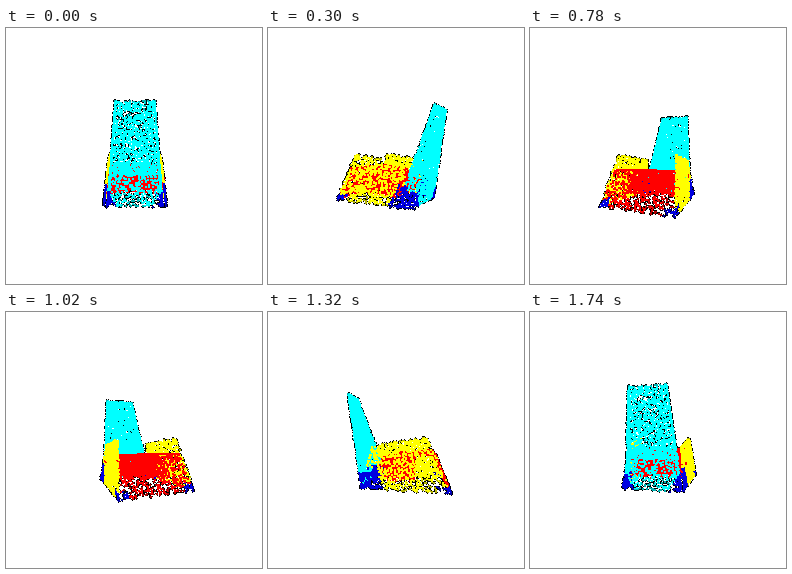
Animation, 256 px wide and 256 px high, one loop 1.8 s. Source, as a matplotlib script:

```python
import numpy as np
import matplotlib.pyplot as plt
from matplotlib.animation import FuncAnimation

SIZE, FRAMES, STEP = 256, 30, 60
CAMERA = 205
CENTER = 128.5, 121.0

CYAN, YELLOW, RED, BLUE = (0, 255, 255), (255, 255, 0), (255, 0, 0), (0, 0, 225)

# Key points of the chair's right half: depth, side, height
TOP, HEEL, INNER = (45, 15.3, 38), (30, 24, -49), (23, 22, -23)
BASE = (14, 24, -49)
ARM_BACK, ARM_FRONT = (20, 24, -12), (-30, 28, -4)
FOOT_BACK, FOOT_FRONT = (30, 27, -49), (-48, 34, -49)
SEAT_BACK, SEAT_EDGE = (0, 23, -21), (-36, 27, -18)

rng = np.random.default_rng(7)
points, colors = [], []


def add(pts, color):
    points.append(pts)
    colors.append(np.tile(color, (len(pts), 1)))


def mirror(p):
    return p[0], -p[1], p[2]


def patch(a, b, c, d, n, color):
    """Scatter n points over the quad a-b-c-d."""
    a, b, c, d = map(np.array, (a, b, c, d))
    s, t = rng.random((2, n, 1))
    add((1 - t) * ((1 - s) * a + s * b) + t * ((1 - s) * d + s * c), color)


def across(p, q, n, color):
    """A panel spanning the chair between p, q and their mirror points."""
    patch(mirror(p), p, q, mirror(q), n, color)


def sides(quad, n, color):
    patch(*quad, n, color)
    patch(*map(mirror, quad), n, color)


across(TOP, HEEL, 1000, CYAN)
across(TOP, INNER, 480, CYAN)
across((32, 20, -11), INNER, 300, CYAN)
sides((TOP, TOP, BASE, HEEL), 420, CYAN)
sides((ARM_BACK, ARM_FRONT, FOOT_FRONT, FOOT_BACK), 760, YELLOW)
across(SEAT_BACK, SEAT_EDGE, 480, RED)
across(SEAT_EDGE, FOOT_FRONT, 520, RED)
add(rng.uniform((-18, -27.5, -42), (14, 27.5, -23), (1100, 3)), RED)

points = np.concatenate(points)
colors = np.concatenate(colors).astype(float)

# Feet
r, u, h = points.T
front = (h < -43) & (abs(u) > 25) & (r < -36)
rear = (h < -30) & (r > 32 + h / 2) & (abs(u) > 42 + 0.55 * h)
colors[front | rear] = BLUE

DY, DX = (g.ravel() for g in np.mgrid[0:2, 0:2])


def neighbours(mask, reach):
    """Count set pixels in the square window around each pixel."""
    span = range(-reach, reach + 1)
    return sum(np.roll(mask, (a, b), (0, 1)).astype(int)
               for a in span for b in span)


def render(i):
    angle = 2 * np.pi * i / FRAMES
    sin, cos = np.sin(angle), np.cos(angle)
    z = r * cos - u * sin
    order = np.argsort(z)
    scale = CAMERA / (CAMERA - z)
    x = np.floor(CENTER[0] + (r * sin + u * cos) * scale).astype(int)
    y = np.floor(CENTER[1] - h * scale).astype(int)

    # Far to near, so the nearest point wins each pixel
    rows = (y[order, None] + DY).ravel()
    cols = (x[order, None] + DX).ravel()
    img = np.full((SIZE, SIZE, 3), 255.0)
    img[rows, cols] = np.repeat(colors[order], len(DX), axis=0)

    # Dim sparse dots and rim them with broken black outlines
    full = np.zeros((SIZE, SIZE), bool)
    full[rows, cols] = True
    img[full & (neighbours(full, 2) < 13)] *= 0.7
    noise = np.random.default_rng(i).random((SIZE, SIZE))
    img[~full & (neighbours(full, 1) > 1) & (noise < 0.6)] = 0
    return img.astype(np.uint8)


fig = plt.figure(figsize=(SIZE / 100, SIZE / 100), dpi=100, facecolor="white")
ax = fig.add_axes([0, 0, 1, 1])
ax.axis("off")
view = ax.imshow(render(0), interpolation="nearest", aspect="auto")


def update(i):
    view.set_data(render(i))
    return [view]


anim = FuncAnimation(fig, update, frames=FRAMES, interval=STEP,
                     repeat=True, repeat_delay=0, blit=False)
plt.show()
```
